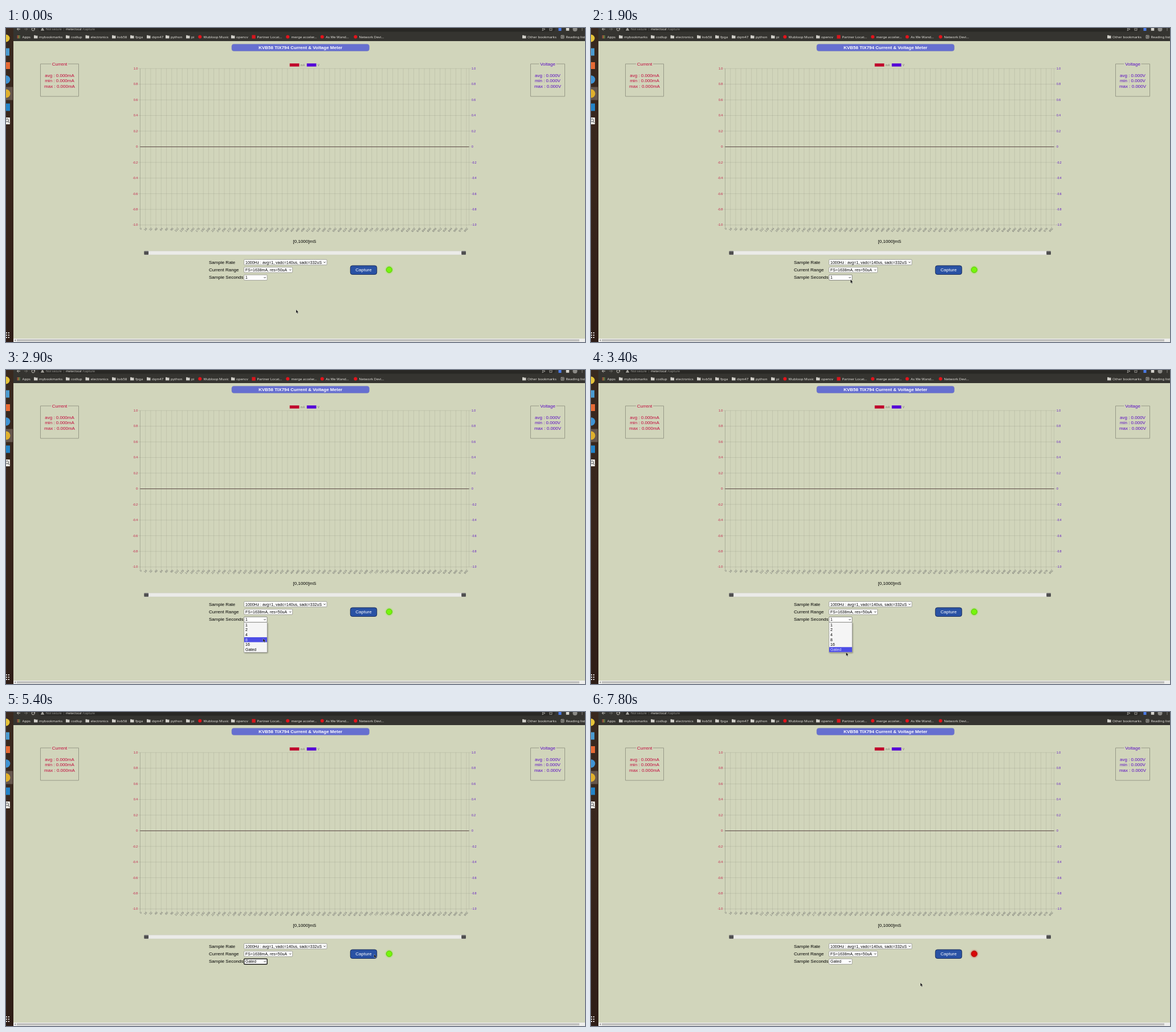
Animation, 1016 px wide and 551 px high, one loop 8000 ms. Source, as an HTML page:

```html
<!DOCTYPE html>
<html lang="en">
<head>
<meta charset="utf-8">
<title>Current and Voltage Meter</title>
<style>
  html, body { margin: 0; width: 100%; height: 100%; overflow: hidden; background: #d1d5bb; }
  svg { display: block; width: 1016px; height: 551px; }
  text { font-family: "Liberation Sans", Arial, sans-serif; font-size: 8px; white-space: pre; }
  .ui { font-family: "Noto Sans", "Open Sans", sans-serif; font-size: 6.15px; fill: #e4e2dc; }
  .url { font-size: 5.45px; }
  .dim { fill: #9b9a95; }
  .tick { font-size: 5px; }
  .opt { font-size: 7px; }
  .mid { text-anchor: middle; }
  .end { text-anchor: end; }
</style>
</head>
<body>
<svg id="stage" viewBox="0 0 1016 551">
  <defs>
    <linearGradient id="dockFill" x1="0" y1="0" x2="0" y2="1">
      <stop offset="0" stop-color="#39291f"/><stop offset=".5" stop-color="#38251b"/><stop offset="1" stop-color="#2e1d16"/>
    </linearGradient>
    <linearGradient id="knobFill" x1="0" y1="0" x2="0" y2="1">
      <stop offset="0" stop-color="#777"/><stop offset=".5" stop-color="#444"/><stop offset="1" stop-color="#666"/>
    </linearGradient>
    <filter id="soft" x="-50%" y="-50%" width="200%" height="200%"><feGaussianBlur stdDeviation="1.2"/></filter>
  </defs>
  <g id="scene"></g>
  <g id="menu"></g>
  <path id="cursor" d="M0 0V6.3L1.4 5.1L2.4 7.2L3.5 6.7L2.6 4.7H4.3Z" fill="#111" stroke="#eee" stroke-width=".35"/>
</svg>
<script>
const LOOP = 8000;
const RED = '#c20a3c', PURPLE = '#5a0cc4';
const scene = document.getElementById('scene');
const menu = document.getElementById('menu');
const cursor = document.getElementById('cursor');

function add(tag, attrs, parent = scene) {
  const node = document.createElementNS('http://www.w3.org/2000/svg', tag);
  for (const key in attrs) node.setAttribute(key, attrs[key]);
  parent.append(node);
  return node;
}
const rect = (x, y, width, height, fill, more, parent) =>
  add('rect', { x, y, width, height, fill, ...more }, parent);
const circle = (cx, cy, r, fill, more) => add('circle', { cx, cy, r, fill, ...more });
const path = (d, stroke, width = 1, more) =>
  add('path', { d, stroke, 'stroke-width': width, fill: 'none', ...more });
function text(x, y, label, cls = '', more = {}, parent = scene) {
  const node = add('text', { x, y, class: cls, ...more }, parent);
  node.textContent = label;
  return node;
}

function drawBrowser() {
  rect(0, 0, 1016, 23, '#353430');
  rect(57, -8, 907, 14.5, '#292825', { rx: 6 });
  path('M25 2H19.5M22 -.5L19.5 2L22 4.5', '#d5d3cd', .9);
  path('M32 2H37.5M35 -.5L37.5 2L35 4.5', '#777570', .9);
  path('M50 1A2.6 2.6 0 1 1 47.5 -.4M50.5 -1V1.2H48.3', '#d5d3cd', .9);
  path('M61.2 4.3L64 -.8L66.8 4.3Z', '#aaa8a2', .5, { fill: '#aaa8a2' });
  text(70, 4.2, 'Not secure', 'ui url dim');
  path('M101.5 -1V5', '#66645f', .5);
  text(105, 4.2, 'meter.local', 'ui url');
  text(134.2, 4.2, '/capture', 'ui url dim');
  path('M941 -.5L946 2L941 4.6L942 2Z', '#c8c6c0', .7);
  path('M956 -.5L957 1.3L959 1.5L957.5 2.8L958 4.8L956 3.8L954 4.8L954.5 2.8L953 1.5L955 1.3Z', '#c8c6c0', .6);
  rect(969.5, -1, 5, 6, '#4b7be6');
  path('M983 0H985V-1H986.5V0H988V4.5H983Z', '#d5d3cd', .5, { fill: '#d5d3cd' });
  circle(998.5, 2, 4, '#8b8a86');
  for (const y of [0, 2, 4]) circle(1011, y, .6, '#d5d3cd');

  const tints = ['#e25b4d', '#e9b93d', '#65ab63'];
  for (let i = 0; i < 9; i++) rect(19.6 + i % 3 * 1.9, 13 + (i / 3 | 0) * 1.9, 1.3, 1.3, tints[i % 3]);
  text(28.5, 17.7, 'Apps', 'ui');
  const folders = [
    [49, 'mybookmarks'], [105, 'codlup'], [139.5, 'electronics'], [186, 'kvb58'], [218, 'fpga'],
    [247, 'dqm47'], [280, 'python'], [316, 'pi'], [395, 'opencv'], [906, 'Other bookmarks']
  ];
  for (const [x, label] of folders) {
    add('path', { d: `M${x} 12.7h2.5l.8 .9h3.2v4.7h-6.5z`, fill: '#d0cec8' });
    text(x + 9, 17.7, label, 'ui');
  }
  const links = [[337, 'Wubloop Music'], [491, 'merge acceler...'], [551.5, 'As We Wand...'], [610, 'Network Devi...']];
  for (const [x, label] of links) {
    circle(x + 3.3, 15.5, 3, '#e3131b');
    text(x + 9.5, 17.7, label, 'ui');
  }
  rect(431.5, 12.4, 6.2, 6.2, '#d8151d');
  text(440.5, 17.7, 'Partner Locat...', 'ui');
  path('M974 13H979V18H974ZM976 13V18M976 15.5H979', '#d0cec8', .7);
  text(982.5, 17.7, 'Reading list', 'ui');
}

function drawDock() {
  rect(0, 0, 13, 551, 'url(#dockFill)');
  rect(0, 103.5, 12, 23, '#65564c');
  circle(0, 18, 6.5, '#e5c338');
  rect(-3, 35.5, 9, 13, '#4a9ad0');
  rect(-3, 60, 10, 12, '#e76a34');
  circle(0, 90.5, 7.3, '#3f93d4');
  circle(0, 115, 7.5, '#e0b02c');
  rect(-5, 132.5, 12, 13, '#2383c8');
  rect(-3, 157, 10, 12, '#eceae6', { rx: 1 });
  circle(2, 162, 2.5, 'none', { stroke: '#555', 'stroke-width': 1 });
  path('M4 164L6 166.5', '#555', 1.1);
  for (let i = 0; i < 9; i++) rect(-4.2 + i % 3 * 4, 534 + (i / 3 | 0) * 4, 2, 2, '#eee');
}

function drawStats(left, width, title, unit, fill) {
  const cx = left + width / 2, gap = title.length * 2 + 1;
  path(`M${cx - gap} 63H${left}V120H${left + width}V63H${cx + gap}`, '#979987', 1);
  text(cx, 65.8, title, 'mid', { fill });
  ['avg', 'min', 'max'].forEach((name, i) =>
    text(cx, 86.2 + i * 9.25, `${name} : 0.000${unit}`, 'mid', { fill }));
}

function drawChart() {
  const left = 235.4, right = 812.5, top = 71.2, rowStep = 27.44, bottom = top + rowStep * 10;
  rect(497.8, 62.2, 16.7, 5.4, '#c0062b');
  text(516.8, 66.6, 'mA', 'tick', { fill: '#777a6c' });
  rect(527.8, 62.2, 16.7, 5.4, '#5500d8');
  text(546.8, 66.6, 'V', 'tick', { fill: '#777a6c' });

  for (let row = 0; row <= 10; row++) {
    const y = top + row * rowStep;
    const label = row === 5 ? '0' : (1 - row / 5).toFixed(1);
    path(`M${left - 4} ${y}H${right + 4}`, '#000', .7, { opacity: .13 });
    text(231, y + 1.8, label, 'tick end', { fill: RED });
    text(817, y + 1.8, label, 'tick', { fill: PURPLE });
  }
  for (let ms = 0; ms < 1000; ms += 16) {
    const x = left + (right - left) * ms / 1000;
    path(`M${x} ${top}V${bottom + 4}`, '#000', .6, { opacity: ms ? .13 : .3 });
    text(0, 0, ms, 'tick end', { fill: '#666', transform: `translate(${x + 3.2} 352) rotate(-50)` });
  }
  path(`M${right} ${top}V${bottom}`, '#000', .6, { opacity: .13 });
  path(`M${left} 208.5H${right}`, '#5c4a45', 1);
  text(524, 376.6, '[0,1000]mS', 'mid');
}

function drawSelect(y, width, label) {
  const box = rect(417.7, y, width, 9.4, '#fff', { rx: 1, stroke: '#777', 'stroke-width': .6 });
  const value = text(420, y + 7.2, label, 'opt');
  const x = 417.7 + width - 4;
  path(`M${x - 1.6} ${y + 3.9}l1.6 1.7l1.6 -1.7`, '#222', .9);
  return { box, value };
}

function drawPage() {
  rect(13, 23, 1003, 528, '#d1d5bb');
  rect(396, 28.3, 241.5, 12.2, '#666fd0', { rx: 4, stroke: '#8187b8', 'stroke-width': .5 });
  text(516.7, 37.3, 'KVB58 TIX794 Current & Voltage Meter', 'mid', { fill: '#fff', 'font-weight': 700 });
  drawStats(60.5, 67, 'Current', 'mA', RED);
  drawStats(920.5, 60, 'Voltage', 'V', PURPLE);
  drawChart();
  rect(243, 391.3, 563, 6.7, '#ebebe8', { rx: 1, stroke: '#c8c9bf', 'stroke-width': .5 });
  for (const x of [242.3, 799.2]) rect(x, 391.2, 7.8, 6.9, 'url(#knobFill)', { rx: 1 });
  ['Sample Rate', 'Current Range', 'Sample Seconds'].forEach((label, i) =>
    text(356, 413.6 + i * 13.4, label));
  rect(13, 545, 1003, 6, '#eeeeec');
  rect(19, 546.2, 987, 3.7, '#bfbfbd');
  path('M16.8 546.8L15.2 548L16.8 549.2Z', '#777', .4, { fill: '#777' });
}

drawPage();
drawBrowser();
drawDock();
drawSelect(406.3, 145.3, '1000Hz : avg=1, vadc=140us, sadc=332uS');
drawSelect(419.7, 85, 'FS=1638mA, res=50uA');
const seconds = drawSelect(433.2, 40.5, '1');
const button = rect(604.3, 417, 46.4, 15.5, '#2a52a4', { rx: 3.5, stroke: '#1b2f5c', 'stroke-width': 1 });
text(627.5, 427.2, 'Capture', 'mid', { fill: '#fff' });
const glow = circle(672.4, 424.3, 6.5, '#000', { filter: 'url(#soft)', opacity: .45 });
const led = circle(672.4, 424.3, 5.1, '#000', { 'stroke-width': .9 });

const ROW = 8.67, MENU_TOP = 442.9;
rect(418.5, MENU_TOP + 1, 41, ROW * 6 + 1, '#000', { opacity: .35, filter: 'url(#soft)' }, menu);
rect(417.7, MENU_TOP, 40.5, ROW * 6 + .5, '#f5f5f5', { stroke: '#888', 'stroke-width': .5 }, menu);
const highlight = rect(418, 0, 40, ROW, '#4d4de6', {}, menu);
const options = ['1', '2', '4', '8', '16', 'Gated'].map((label, i) =>
  text(420, MENU_TOP + i * ROW + 6.6, label, 'opt', {}, menu));

// time, x, y
const track = [
  [0, 509, 494], [500, 509, 494], [600, 512.5, 494.5], [700, 510, 495], [900, 494.5, 490.5],
  [1000, 494.5, 490.5], [1100, 491, 485], [1500, 472, 463], [1900, 455.3, 441.3],
  [2500, 455.3, 441.3], [2600, 452, 445], [2800, 452, 460], [3200, 448.5, 504], [3400, 447.5, 495.3],
  [3600, 452, 489], [3800, 452, 489], [4000, 448.5, 489.5], [4500, 448.5, 489.5],
  [4800, 505, 466], [5000, 610, 440], [5200, 685, 419.5], [5400, 646, 425],
  [6100, 646, 425], [6500, 641.3, 436], [6700, 578.5, 475.5], [6900, 577, 475],
  [7700, 577, 475], [7800, 578, 475], [8000, 578, 475]
];

function cursorAt(t) {
  const next = track.findIndex(point => point[0] > t);
  const [t0, x0, y0] = track[next - 1], [t1, x1, y1] = track[next];
  const k = (t - t0) / (t1 - t0);
  return [x0 + (x1 - x0) * k, y0 + (y1 - y0) * k];
}

const lamps = {
  green: ['#76f50c', '#55bd0c'],
  yellow: ['#cfe32e', '#cfdc4c'],
  red: ['#d80808', '#a30c0c']
};

function render(now) {
  const t = Math.floor(now % LOOP / 100) * 100;
  const [x, y] = cursorAt(t);
  cursor.setAttribute('transform', `translate(${x} ${y})`);

  const open = t >= 2200 && t < 4300;
  menu.style.display = open ? '' : 'none';
  const row = Math.max(0, Math.min(5, Math.floor((y - MENU_TOP) / ROW)));
  highlight.setAttribute('y', MENU_TOP + row * ROW);
  options.forEach((option, i) => option.setAttribute('fill', i === row ? '#e4e4ff' : '#000'));

  const focused = t >= 4300 && t < 5600;
  const hovered = t >= 1800 && t < 4300;
  seconds.value.textContent = t < 4300 ? '1' : 'Gated';
  seconds.box.setAttribute('stroke', focused ? '#000' : hovered ? '#444' : '#777');
  seconds.box.setAttribute('stroke-width', focused ? 1.3 : .6);

  button.setAttribute('fill', t >= 5600 && t < 5800 ? '#23468f' : '#2a52a4');
  const [fill, edge] = lamps[t < 5800 ? 'green' : t < 7000 ? 'yellow' : 'red'];
  led.setAttribute('fill', fill);
  led.setAttribute('stroke', edge);
  glow.setAttribute('fill', fill);
}

function loop() {
  render(performance.now());
  requestAnimationFrame(loop);
}
loop();
</script>
</body>
</html>
```
